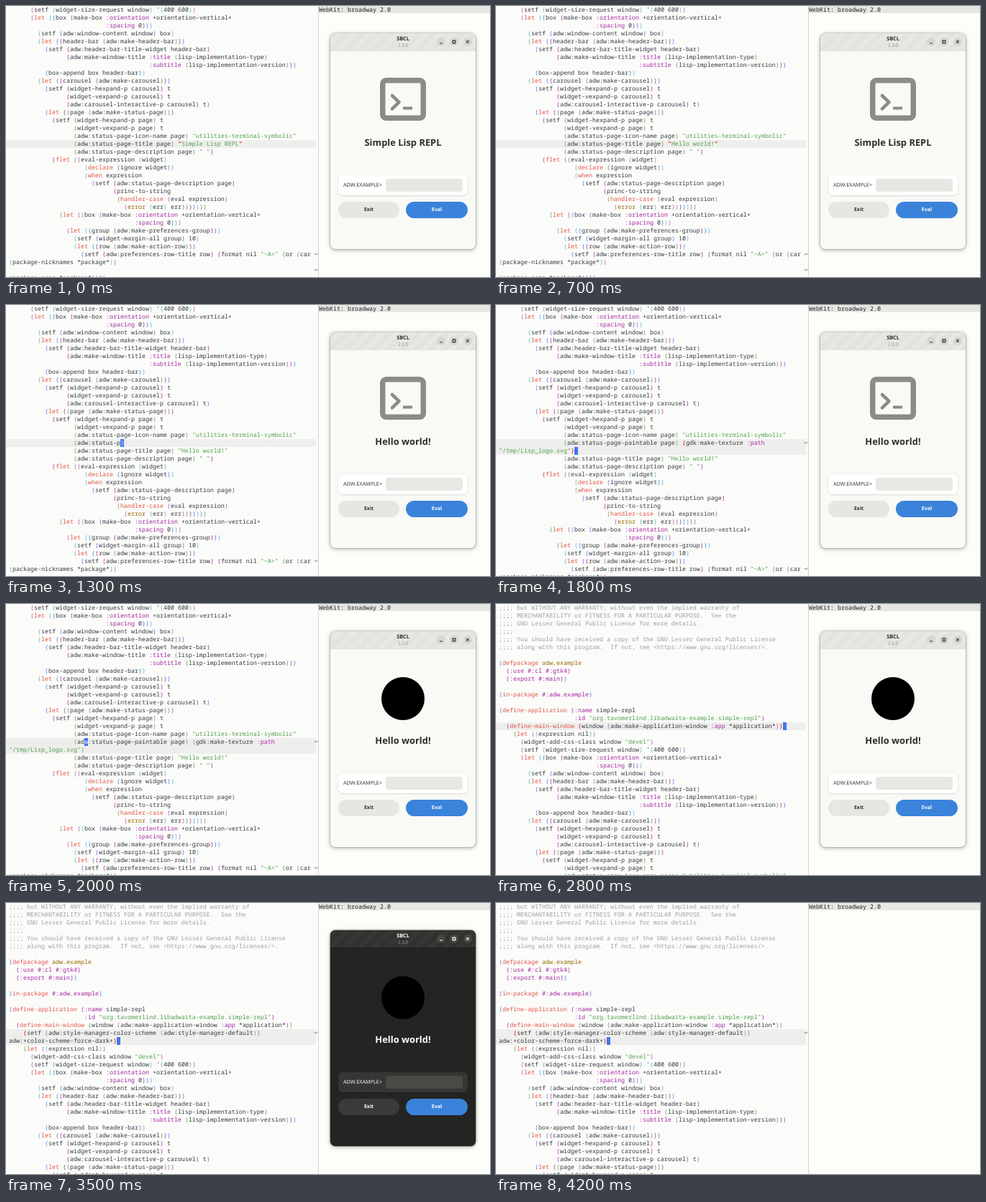
Write an HTML page that moves like this. It is 673 by 378 pixels and loops after 4300 ms.

```html
<!DOCTYPE html>
<html lang="en">
<head>
<meta charset="utf-8">
<title>Lisp live coding</title>
<style>
  html, body { margin: 0; width: 100%; height: 100%; overflow: hidden; }
  body { position: relative; background: #fdfdfa; text-rendering: geometricPrecision; }
  #editor, #bar { font: 8.333px/11px "Noto Sans Mono", "DejaVu Sans Mono", monospace; color: #383a42; white-space: pre; }
  #editor { position: absolute; left: 0; top: 0; width: 434px; height: 378px; overflow: hidden; background: #fbfbf9; border-right: 1px solid #d4d4d1; }
  #bar { position: absolute; left: 435px; top: 0; width: 238px; height: 10px; background: #e6e6e3; color: #222; }
  .row { position: relative; height: 11px; padding-left: 4px; width: 427px; }
  .row span { display: inline-block; height: 11px; vertical-align: top; }
  .row.current { background: #eeeeec; }
  .row.wrapped::after { content: "↩"; position: absolute; left: 429px; top: 0; font: 6px/11px "DejaVu Sans", sans-serif; color: #555; }
  .comment { color: #9ca0a4; }
  .string { color: #50a14f; }
  .builtin { color: #a626a4; }
  .keyword { color: #e45649; }
  .type { color: #986801; }
  .d1 { color: #4078f2; } .d2 { color: #a626a4; } .d3 { color: #50a14f; } .d4 { color: #b751b6; } .d0 { color: #4db5bd; }
  .flash { background: #4375ea; color: #f4f6fc; }
  .match { background: #f0f0ee; color: #e4372a; font-weight: bold; }
  .cursor { background: #4078f2; color: #fafafa; }

  #app {
    --bg: #f9f9f5; --head: #e7e7e3; --fg: #2e2e2c; --dim: #8c8c88; --round: #d6d6d2;
    --card: #fff; --entry: #e7e7e3; --button: #e6e6e2; --stripe: rgba(0,0,0,.018); --edge: rgba(0,0,0,.2);
    position: absolute; left: 451px; top: 38px; width: 202px; height: 301px; overflow: hidden;
    border-radius: 7px; background: var(--bg); color: var(--fg);
    font: 7.3px/10px "Open Sans", "Noto Sans", sans-serif;
    box-shadow: 0 0 0 .6px var(--edge), 0 1px 5px rgba(0,0,0,.3), 0 2px 10px rgba(0,0,0,.08);
  }
  #app.dark {
    --bg: #242422; --head: #31312f; --fg: #fff; --dim: #a0a09c; --round: #464643;
    --card: #363634; --entry: #494946; --button: #3a3a38; --stripe: rgba(255,255,255,.022); --edge: rgba(0,0,0,.5);
  }
  #app * { position: absolute; }
  #app .line { left: 0; width: 100%; text-align: center; }
  .head { left: 0; top: 0; width: 100%; height: 24px; box-shadow: 0 .5px 0 var(--edge);
    background: repeating-linear-gradient(135deg, var(--stripe) 0 7px, transparent 7px 14px) var(--head); }
  .name { top: 3px; font-weight: bold; }
  .version { top: 11.5px; font-size: 6.3px; color: var(--dim); }
  .controls { left: 148px; top: 6px; }
  .controls circle { fill: var(--round); }
  .controls path { fill: none; stroke: var(--fg); stroke-width: 1.2; }
  #terminal { left: 69px; top: 62px; fill: none; stroke: #8b8b87; }
  #logo { left: 71px; top: 64px; width: 60px; height: 60px; border-radius: 50%; background: #000; }
  #title { top: 143px; font: bold 12.9px/18px "Open Sans", "Noto Sans", sans-serif; }
  .card { left: 11px; top: 198px; width: 180px; height: 28px; border-radius: 6px; background: var(--card); box-shadow: 0 .5px 2px rgba(0,0,0,.2); }
  .prompt { left: 7px; top: 9px; }
  .entry { left: 65.5px; top: 5px; width: 107.5px; height: 18px; border-radius: 4px; background: var(--entry); }
  .pill { top: 235px; height: 23px; border-radius: 12px; font-size: 7px; font-weight: bold; line-height: 23px; text-align: center; }
  .exit { left: 11px; width: 85px; background: var(--button); }
  .eval { left: 105px; width: 86px; background: #3b83da; color: #fff; }
</style>
</head>
<body>
<div id="editor"></div>
<div id="bar">WebKit: broadway 2.0</div>
<div id="app">
  <div class="head">
    <div class="line name">SBCL</div>
    <div class="line version">2.3.0</div>
    <svg class="controls" width="50" height="12">
      <circle cx="6" cy="6" r="6"/><circle cx="24" cy="6" r="6"/><circle cx="43" cy="6" r="6"/>
      <path d="M4 8h4M22.2 4.2h3.6v3.6h-3.6zM41.2 4.2l3.6 3.6m0-3.6l-3.6 3.6"/>
    </svg>
  </div>
  <svg id="terminal" width="64" height="60">
    <rect x="3.75" y="3.75" width="56.5" height="52.5" rx="5" stroke-width="7.5"/>
    <path d="M17 25l9.5 9.2l-9.5 9.2" stroke-width="4.6" stroke-linecap="round" stroke-linejoin="round"/>
    <path d="M32 42.5h13" stroke-width="4"/>
  </svg>
  <div id="logo"></div>
  <div id="title" class="line"></div>
  <div class="card"><div class="prompt">ADW.EXAMPLE&gt;</div><div class="entry"></div></div>
  <div class="pill exit">Exit</div>
  <div class="pill eval">Eval</div>
</div>
<script>
const LOOP = 4300, STEP = 100, COLUMNS = 85, ROWS = 35;
const DEFINITION = 13, NEW_SCHEME = 16, TITLE = 35;

const source = `;;;; but WITHOUT ANY WARRANTY; without even the implied warranty of
;;;; MERCHANTABILITY or FITNESS FOR A PARTICULAR PURPOSE.  See the
;;;; GNU Lesser General Public License for more details.
;;;;
;;;; You should have received a copy of the GNU Lesser General Public License
;;;; along with this program.  If not, see <https://www.gnu.org/licenses/>.

(defpackage adw.example
  (:use #:cl #:gtk4)
  (:export #:main))

(in-package #:adw.example)

(define-application (:name simple-repl
                     :id "org.tavomerlind.libadwaita-example.simple-repl")
  (define-main-window (window (adw:make-application-window :app *application*))
    (let ((expression nil))
      (widget-add-css-class window "devel")
      (setf (widget-size-request window) '(400 600))
      (let ((box (make-box :orientation +orientation-vertical+
                           :spacing 0)))
        (setf (adw:window-content window) box)
        (let ((header-bar (adw:make-header-bar)))
          (setf (adw:header-bar-title-widget header-bar)
                (adw:make-window-title :title (lisp-implementation-type)
                                       :subtitle (lisp-implementation-version)))
          (box-append box header-bar))
        (let ((carousel (adw:make-carousel)))
          (setf (widget-hexpand-p carousel) t
                (widget-vexpand-p carousel) t
                (adw:carousel-interactive-p carousel) t)
          (let ((page (adw:make-status-page)))
            (setf (widget-hexpand-p page) t
                  (widget-vexpand-p page) t
                  (adw:status-page-icon-name page) "utilities-terminal-symbolic"
                  (adw:status-page-title page) "Simple Lisp REPL"
                  (adw:status-page-description page) " ")
            (flet ((eval-expression (widget)
                     (declare (ignore widget))
                     (when expression
                       (setf (adw:status-page-description page)
                             (princ-to-string
                              (handler-case (eval expression)
                                (error (err) err)))))))
              (let ((box (make-box :orientation +orientation-vertical+
                                   :spacing 0)))
                (let ((group (adw:make-preferences-group)))
                  (setf (widget-margin-all group) 10)
                  (let ((row (adw:make-action-row)))
                    (setf (adw:preferences-row-title row) (format nil "~A>" (or (car (package-nicknames *package*))
${' '.repeat(80)}(package-name *package*))))`.split('\n');

const titleEdits = ['Simple Lisp REPL', 'Simple Lisp ', 'Simple ', '', 'Hel', 'Hello w', 'Hello world!'];
const paintable = '(adw:status-page-paintable page) (gdk:make-texture :path "/tmp/Lisp_logo.svg")';
const darkScheme = '(setf (adw:style-manager-color-scheme (adw:style-manager-default)) adw:+color-scheme-force-dark+)';

const $ = id => document.getElementById(id);

// Text typed so far, with quotes and parentheses closed automatically.
function typed(text, progress, indent) {
  const part = text.slice(0, Math.round(text.length * Math.min(progress, 1)));
  const quote = part.split('"').length % 2 ? '' : '"';
  const open = part.split('(').length - part.split(')').length;
  const lead = ' '.repeat(indent);
  return { line: lead + part + quote + ')'.repeat(open), col: lead.length + part.length };
}

function stateAt(step) {
  const lines = [...source];
  const at = (line, col = Infinity) => ({ line, col: Math.min(col, lines[line].length) });
  const title = titleEdits[Math.min(step, titleEdits.length - 1)];
  lines[TITLE] = `${' '.repeat(18)}(adw:status-page-title page) "${title}"`;
  let cursor = at(TITLE, lines[TITLE].length - (step > 0 && step < 7 ? 1 : 0));

  if (step >= 12) cursor = at(TITLE - 1);
  if (step >= 13) {
    const entry = typed(paintable, (step - 12) / 6, 18);
    lines.splice(TITLE, 0, entry.line);
    cursor = at(TITLE, entry.col);
  }
  if (step >= 20) cursor = at(TITLE - 3 * (step - 20 > 5 ? 6 : step - 20), 21);
  if (step >= 27) cursor = at(15, 21);
  if (step >= 28) cursor = at(15);
  if (step >= 29) {
    const entry = typed(darkScheme, (step - 28) / 5, 4);
    lines.splice(NEW_SCHEME, 0, entry.line);
    cursor = at(NEW_SCHEME, entry.col);
  }
  return {
    lines, cursor,
    blink: step === 0 || (step >= 7 && step <= 11),
    scroll: step < 26 ? 18 : 0,
    flash: [10, 19, 34].includes(step),
    title: step < 10 ? titleEdits[0] : title,
    logo: step >= 19,
    dark: step >= 34,
    open: step < 41
  };
}

// One class name per character of every line.
function highlight(lines) {
  let depth = 0;
  return lines.map(text => {
    const paint = [];
    let previous = '';
    for (const [token] of text.matchAll(/^;.*|"[^"]*"?|#?:[\w.-]+|[()]|[^\s()"]+|\s+/g)) {
      let style = '';
      if (token[0] === ';') style = 'comment';
      else if (token[0] === '"') style = 'string';
      else if (/^#?:/.test(token)) style = 'builtin';
      else if (token === '(') style = 'd' + ++depth % 5;
      else if (token === ')') style = 'd' + depth-- % 5;
      else if (previous === '(' && /^(let|flet|when|declare|handler-case|in-package|defpackage|define-.*)$/.test(token)) style = 'keyword';
      else if (previous === 'defpackage' || (previous === '(' && token === 'error')) style = 'type';
      for (let i = 0; i < token.length; i++) paint.push(style);
      if (token.trim()) previous = token;
    }
    return paint;
  });
}

// Columns of the delimiter before the cursor and its partner.
function matchingPair(text, col) {
  const end = col - 1;
  if (text[end] === '"') return [text.lastIndexOf('"', end - 1), end];
  if (text[end] !== ')') return [];
  let start = end, depth = 1;
  while (depth && start > 0) {
    start--;
    depth += text[start] === ')' ? 1 : text[start] === '(' ? -1 : 0;
  }
  return [start, end];
}

function wrap(text) {
  const cuts = [0];
  while (text.length - cuts.at(-1) > COLUMNS) cuts.push(text.lastIndexOf(' ', cuts.at(-1) + COLUMNS - 1) + 1);
  return cuts.map((from, i) => [from, cuts[i + 1] ?? text.length]);
}

function buildRow(text, styles, classes) {
  const row = document.createElement('div');
  row.className = 'row ' + classes;
  for (let i = 0; i < text.length;) {
    let end = i + 1;
    while (end < text.length && styles[end] === styles[i]) end++;
    const span = document.createElement('span');
    span.className = styles[i];
    span.textContent = text.slice(i, end);
    row.append(span);
    i = end;
  }
  return row;
}

function renderEditor({ lines, cursor, blink, scroll, flash }) {
  const paints = highlight(lines);
  const rows = [];
  lines.forEach((text, n) => {
    const current = n === cursor.line;
    const pair = current ? matchingPair(text, cursor.col) : [];
    const style = i => {
      if (current && i === cursor.col) return blink ? paints[n][i] || '' : 'cursor';
      if (pair.includes(i)) return 'match';
      return flash && n >= DEFINITION ? 'flash' : paints[n][i] || '';
    };
    for (const [from, to] of wrap(text)) {
      const last = to === text.length;
      const cells = text.slice(from, to) + (last ? ' ' : '');
      const styles = [...cells].map((_, i) => style(from + i));
      rows.push(buildRow(cells, styles, (current ? 'current ' : '') + (last ? '' : 'wrapped')));
    }
  });
  $('editor').replaceChildren(...rows.slice(scroll, scroll + ROWS));
}

function renderApp({ title, logo, dark, open }) {
  $('app').style.display = open ? '' : 'none';
  $('app').classList.toggle('dark', dark);
  $('title').textContent = title;
  $('logo').style.display = logo ? '' : 'none';
  $('terminal').style.display = logo ? 'none' : '';
}

let shown = -1;
function tick() {
  const step = Math.floor(performance.now() % LOOP / STEP);
  if (step !== shown) {
    const state = stateAt(step);
    renderEditor(state);
    renderApp(state);
    shown = step;
  }
  requestAnimationFrame(tick);
}
tick();
</script>
</body>
</html>
```
